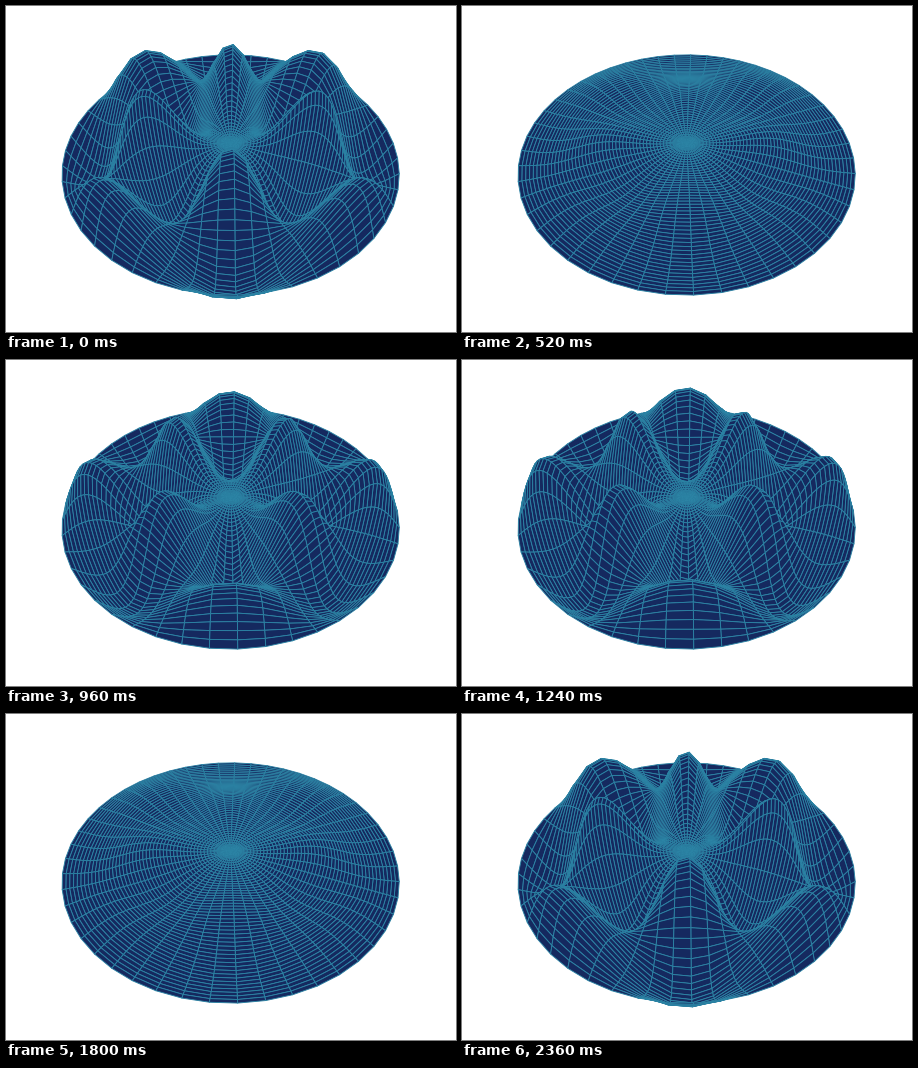
Animation, 450 px wide and 326 px high, one loop 2400 ms. Source, as a matplotlib script:

```python
import numpy as np
import matplotlib.pyplot as plt
from matplotlib.animation import FuncAnimation
from matplotlib.collections import PolyCollection

W, H = 450, 326
FRAMES, INTERVAL = 60, 40

# Vibrating membrane mode: four nodal diameters, second radial zero
ORDER, ZERO = 4, 11.0647
POINTS = 50

# Perspective camera looking at the centre of the membrane
ELEV = np.radians(43.4)
DIST, FOCAL = 2.745, 446.5
CX, CY = 224.6, 137.2
SIN, COS = np.sin(ELEV), np.cos(ELEV)

FACE, EDGE = "#15295f", "#2b83a4"


def bessel(n, x):
    tau = (np.arange(400) + 0.5) * np.pi / 400
    return np.cos(n * tau - np.multiply.outer(x, np.sin(tau))).mean(axis=-1)


def project(x, y, z):
    scale = FOCAL / (DIST + y * COS - z * SIN)
    return np.stack([CX + x * scale, CY - (y * SIN + z * COS) * scale], axis=-1)


def cells(grid):
    """Split a grid of vertices into its four-cornered cells."""
    corners = [grid[:-1, :-1], grid[1:, :-1], grid[1:, 1:], grid[:-1, 1:]]
    quads = np.stack(corners, axis=2)
    return quads.reshape(-1, 4, *grid.shape[2:])


radius = np.linspace(0, 1, POINTS)
angle = np.linspace(0, 2 * np.pi, POINTS)
R, A = np.meshgrid(radius, angle, indexing="ij")
X, Y = R * np.cos(A), R * np.sin(A)
SHAPE = bessel(ORDER, ZERO * R) * np.cos(ORDER * A)

# A height field hides correctly when drawn by ground distance, far to near
ground = np.hypot(cells(X).mean(axis=1), cells(Y).mean(axis=1) + DIST * COS)
draw_order = np.argsort(-ground)

fig = plt.figure(figsize=(W / 100, H / 100), dpi=100, facecolor="white")
ax = fig.add_axes([0, 0, 1, 1])
ax.set_xlim(0, W)
ax.set_ylim(H, 0)
ax.axis("off")

mesh = PolyCollection([], facecolors=FACE, edgecolors=EDGE,
                      linewidths=0.65, joinstyle="round")
ax.add_collection(mesh, autolim=False)


def update(i):
    swing = np.cos(2 * np.pi * (i + 1) / FRAMES)
    mesh.set_verts(cells(project(X, Y, SHAPE * swing))[draw_order])
    return [mesh]


anim = FuncAnimation(fig, update, frames=FRAMES, interval=INTERVAL,
                     repeat=True, repeat_delay=0)
plt.show()
```
